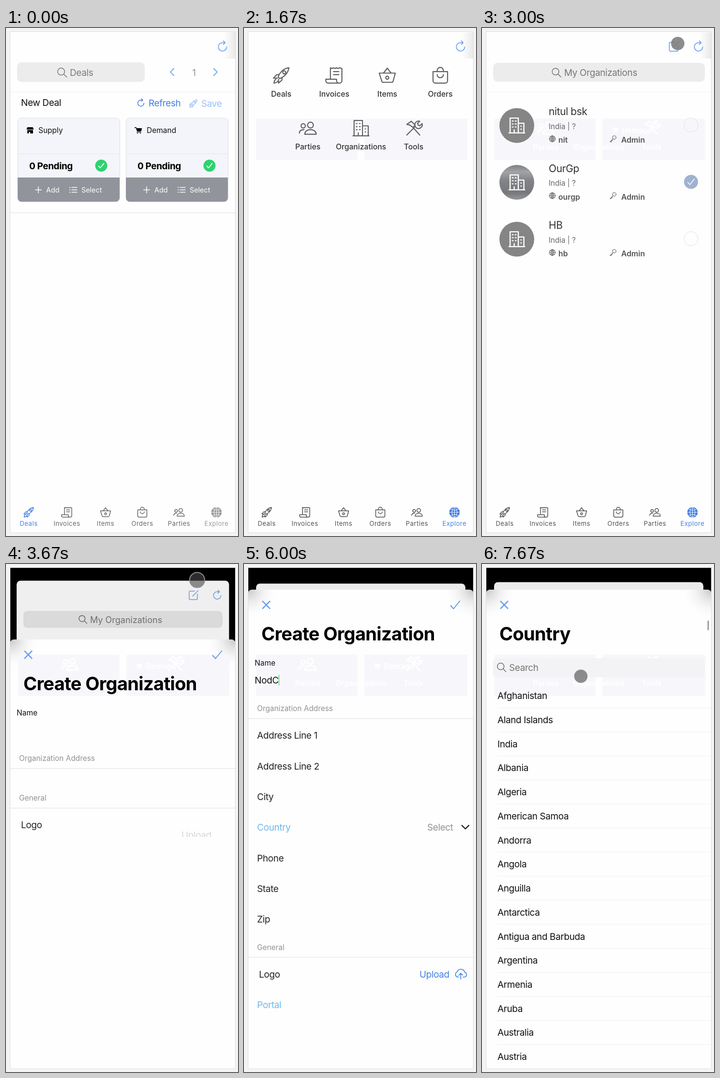
Animation, 480 px wide and 1050 px high, one loop 8 s. Source, as an HTML page:

```html
<!DOCTYPE html>
<html lang="en">
<head>
<meta charset="utf-8">
<title>Create organization</title>
<style>
html, body { margin: 0; width: 100%; height: 100%; overflow: hidden; background: #f4f4f4; }
svg { display: block; width: 100%; height: 100%; }
text { font-family: Inter, Roboto, sans-serif; white-space: pre; }
</style>
</head>
<body>
<svg viewBox="0 0 480 1050" xmlns="http://www.w3.org/2000/svg">
  <defs>
    <clipPath id="phone"><rect x="9" y="8" width="465" height="1034.5"/></clipPath>
    <linearGradient id="edge"><stop offset="0" stop-color="#fff"/><stop offset="1" stop-color="#e9e9e9"/></linearGradient>
    <linearGradient id="photo" x2="0" y2="1"><stop offset="0" stop-color="#808083"/><stop offset=".2" stop-color="#a2a3a7"/><stop offset=".45" stop-color="#828387"/><stop offset=".8" stop-color="#77787c"/><stop offset="1" stop-color="#96979a"/></linearGradient>
    <radialGradient id="corner"><stop offset="0" stop-color="#c4c4c4"/><stop offset="1" stop-color="#fff" stop-opacity="0"/></radialGradient>
    <filter id="soft" x="-10%" y="-40%" width="120%" height="180%"><feGaussianBlur stdDeviation="3"/></filter>
  </defs>
  <rect x="8.5" y="7.5" width="466" height="1035.5" fill="#fefefe" stroke="#dcdcdc"/>
  <g id="view" clip-path="url(#phone)"></g>
  <g id="over"></g>
</svg>
<script>
const LOOP = 8000;
const BLUE = '#427fe6', SKY = '#6fb8ee', GREY = '#929292', INK = '#222';
const view = document.getElementById('view'), over = document.getElementById('over');

// Icons live in a 24 x 24 box.
const ICONS = {
  rocket: '<path d="M8 14C10 8 15 3 22 2c-1 7-6 12-12 14zM9 11H6l-4 4.500h5M13 15v3l-4.500 4v-5M5 17c-2 1-2.500 5-2.500 5s4-.5 5-2.500"/><circle cx="16" cy="8" r="2"/>',
  invoice: '<path d="M7 16V2l2 1 2-1 2 1 2-1 2 1 2-1 3 1v16a3 3 0 0 1-3 3H4a3 3 0 0 1-3-3v-2h14v2a3 3 0 0 0 3 3M11 7h7M11 11h7"/>',
  basket: '<path d="M1.500 9h21l-3 11a2 2 0 0 1-2 1H7a2 2 0 0 1-2-1zM7 9l5-6.500L17 9"/><circle cx="12" cy="15" r="2"/>',
  bag: '<path d="M2.500 7h19v12a3 3 0 0 1-3 3h-13a3 3 0 0 1-3-3zM8 7V5.500a4 4 0 0 1 8 0V7M8 11a4 4 0 0 0 8 0"/>',
  people: '<circle cx="15.500" cy="8" r="3.800"/><path d="M8 20c0-3.500 3-6 7.500-6s7.500 2.500 7.500 6zM1 18.500c0-3 2-4.500 6-4.500"/><circle cx="6" cy="9" r="2.800"/>',
  grid: '<path d="M2 12h20M12 2v20M4.500 5.500q7.500 5 15 0M4.500 18.500q7.500-5 15 0"/><ellipse cx="12" cy="12" rx="5" ry="10"/>',
  globe: '<circle cx="12" cy="12" r="10"/><ellipse cx="12" cy="12" rx="4.500" ry="10"/><path d="M2 12h20M12 2v20M4.500 6q7.500 4 15 0M4.500 18q7.500-4 15 0"/>',
  search: '<circle cx="10" cy="10" r="7.600"/><path d="M15.700 15.700 22 22"/>',
  refresh: '<path d="M20 13a8 8 0 1 1-8-8h5M13.500 1.500 17 5l-3.500 3.500"/>',
  edit: '<path d="M20 10v10a1.500 1.500 0 0 1-1.500 1.500h-14A1.500 1.500 0 0 1 3 20V5.500A1.500 1.500 0 0 1 4.500 4H14M10 14.500 21.500 3"/>',
  key: '<circle cx="16" cy="8" r="5.500"/><path d="M12 12 2.500 21.500H7V18h3v-3"/>',
  cloud: '<path d="M8 18H6a5 5 0 0 1-.5-9.500A7 7 0 0 1 19 9a4.600 4.600 0 0 1 0 9h-3M12 22V11.500M8.500 14.500 12 11l3.500 3.500"/>',
  tools: '<path d="M3 21 13 11M3 7l6-4 5 5-3 3-4-3zM12 12l8 9M14 10a5 5 0 0 1 6-7l-3 3 1 2 2 1 3-3a5 5 0 0 1-7 6z"/>',
  building: '<path d="M3 22V2h11v20M14 9h7.500v13M1.500 22h21M6 6h1M10 6h1M6 10h1M10 10h1M6 14h1M10 14h1M8.500 22v-4M17.500 13h.5M17.500 17h.5"/>',
  store: '<path fill="currentColor" d="M4 3h16l2 6-2 3v9h-7v-5H7v5H4v-9L2 9z"/><path stroke="#f4f5fa" d="M2 10.500h20"/>',
  cart: '<path fill="currentColor" d="M1 3h4l1 3h16l-2 9H8L5 4H1zM7 18h13"/><circle cx="9" cy="21" r="1"/><circle cx="18" cy="21" r="1"/>',
  list: '<path d="M8 5h15M8 12h15M8 19h15M1.500 5h2M1.500 12h2M1.500 19h2"/>',
  plus: '<path d="M12 2v20M2 12h20"/>',
  close: '<path d="M4 4l16 16M20 4 4 20"/>',
  check: '<path d="M2.500 13.500 8.500 20 21.500 4"/>',
  left: '<path d="M16 3 7 12l9 9"/>',
  right: '<path d="M8 3l9 9-9 9"/>',
  down: '<path d="M3 8l9 9 9-9"/>'
};

function icon(name, x, y, size, color, weight = 1.5) {
  const k = size / 24;
  return `<g transform="translate(${x - size / 2} ${y - size / 2}) scale(${k})" fill="none" color="${color}" stroke="${color}" stroke-width="${weight / k}" stroke-linecap="round" stroke-linejoin="round">${ICONS[name]}</g>`;
}

function text(x, y, s, { size = 19, fill = '#111', weight = 400, anchor = 'start', id = '' } = {}) {
  const gap = size > 30 ? -.68 : size >= 19 ? -.4 : size <= 13 ? .55 : 0;
  return `<text ${id && `id="${id}"`} x="${x}" y="${y}" font-size="${size}" font-weight="${weight}" fill="${fill}" letter-spacing="${gap}" text-anchor="${anchor}">${s}</text>`;
}

const rect = (x, y, w, h, fill, r = 0, more = '') =>
  `<rect x="${x}" y="${y}" width="${w}" height="${h}" rx="${r}" fill="${fill}" ${more}/>`;
const disc = (x, y, r, fill, more = '') => `<circle cx="${x}" cy="${y}" r="${r}" fill="${fill}" ${more}/>`;
const line = (x, y, color = '#dfdfdf') => `<path d="M${x} ${y}H474" stroke="${color}"/>`;
const group = (body, y = 0, alpha = 1) => `<g transform="translate(0 ${y})" opacity="${alpha}">${body}</g>`;
const pointer = (x, y) => disc(x, y, 13.8, '#7d7d7d', 'fill-opacity=".88"');

const TABS = [
  ['Deals', 'rocket', 47], ['Invoices', 'invoice', 126], ['Items', 'basket', 206],
  ['Orders', 'bag', 282], ['Parties', 'people', 358], ['Explore', 'globe', 435.500]
];

function tabs(active) {
  return TABS.map(([label, name, x], i) => {
    const rest = active === 5 ? '#4c5054' : '#646668';
    const color = i === active ? BLUE : i === 5 ? '#9a9a9a' : rest;
    const pic = i === 5
      ? disc(x, 1001, 10.8, color) + icon('grid', x, 1001, 25, '#fff', .9)
      : icon(name, x, 1001, 24, color);
    return pic + text(x, 1028.500, label, { size: 13, fill: color, anchor: 'middle' });
  }).join('');
}

function header() {
  return rect(450, 9, 24, 54, 'url(#edge)') + icon('refresh', 448, 38, 26, '#6a9ff0', 1.7);
}

function dealCard(x, label, name) {
  return rect(x + .5, 186, 211, 173, '#f4f5fa', 8, 'stroke="#dedfe4"') +
    `<path d="M${x} 260h212" stroke="#e3e4e8"/>` +
    `<path d="M${x} 309h211v42a8 8 0 0 1-8 8h-195a8 8 0 0 1-8-8z" fill="#92949c"/>` +
    icon(name, x + 26, 211.5, 16, '#000', 1) + text(x + 43, 217.3, label, { size: 15.5 }) +
    text(x + 24, 291.5, '0 Pending', { weight: 700, fill: '#000' }) +
    disc(x + 173, 284.500, 12.5, '#2dd36f') + icon('check', x + 173, 284.500, 14, '#fff', 1.8) +
    icon('plus', x + 43, 334.500, 15, '#fff') + text(x + 59, 340, 'Add', { size: 14.4, fill: '#fff' }) +
    icon('list', x + 115, 334.500, 17, '#fff') + text(x + 132, 340, 'Select', { size: 14.4, fill: '#fff' });
}

function deals() {
  return header() + rect(23, 71, 264, 40.5, '#ececec', 9) +
    icon('search', 116, 92, 23, '#747474') + text(132, 99, 'Deals', { fill: '#7c7c7c' }) +
    icon('left', 344, 91, 19, '#86b3f7', 2.4) + text(389, 98.500, '1', { fill: GREY, anchor: 'middle' }) +
    icon('right', 433, 91, 19, '#86b3f7', 2.4) + line(9, 132.5, '#f0f0f0') +
    text(31, 161, 'New Deal') + icon('refresh', 279, 154.500, 19, BLUE) + text(295, 162, 'Refresh', { fill: BLUE }) +
    icon('rocket', 387.500, 156, 19, '#9dc0f6', 1.3) + text(404, 163, 'Save', { fill: '#9dc0f6' }) +
    dealCard(24, 'Supply', 'store') + dealCard(248, 'Demand', 'cart') + line(9, 382, '#dcdcdf');
}

// Faint remains of the earlier screens that stay visible under later ones.
function trail(labels) {
  const white = { size: 15.7, fill: '#fff', weight: 600, anchor: 'middle' };
  let out = rect(25, 187, 210, 86, '#f7f7fb', 4) + rect(249, 187, 213, 86, '#f7f7fb', 4);
  if (labels) {
    out += icon('people', 132, 207, 36, '#fff', 3) + icon('tools', 351, 206, 36, '#fff', 3) +
      icon('cart', 275, 211, 16, '#fff', 1) + text(321, 217.3, 'Demand', white) +
      text(132, 251.500, 'Parties', white) + text(242, 251.500, 'Organizations', white) + text(351, 251.500, 'Tools', white);
  }
  return out;
}

function explore() {
  const tile = (label, name, x, y) => icon(name, x, y, 38, '#5f6163', 2.2) +
    text(x, y + 44, label, { size: 15.7, fill: '#333', weight: 500, anchor: 'middle' });
  return header() + TABS.slice(0, 4).map(([label, name], i) => tile(label, name, 77 + i * 109.7, 98)).join('') +
    tile('Parties', 'people', 132, 207) + tile('Organizations', 'building', 242, 207) + tile('Tools', 'tools', 351, 207);
}

const GROUPS = [['nitul bsk', 'nit'], ['OurGp', 'ourgp'], ['HB', 'hb']];

function groups() {
  return GROUPS.map(([name, tag], i) => {
    const y = i * 117.5, on = i === 1;
    return disc(72, 201.500 + y, 36, on ? 'url(#photo)' : '#858585') + icon('building', 72, 201.500 + y, 37, '#fff', 2.4) +
      text(138, 180 + y, name, { size: 21, fill: '#333' }) +
      text(138, 208.5 + y, 'India | ?', { size: 15.2, fill: '#666' }) +
      icon('globe', 145.500, 229 + y, 15, '#555', 1) + text(158, 237 + y, tag, { size: 15.8, weight: 600, fill: '#555' }) +
      icon('key', 271, 229 + y, 16, '#555', 1) + text(288, 237 + y, 'Admin', { size: 15.8, weight: 600, fill: '#555' }) +
      disc(432.500, 200.5 + y, 14.5, on ? '#9fb2d0' : 'none', on ? '' : 'stroke="#e2e2e2"') +
      (on ? icon('check', 432.500, 200.5 + y, 17, '#fff') : '');
  }).join('');
}

function orgPage(loading) {
  const query = icon('search', 154, 92, 22, '#707070') + text(170, 99, 'My Organizations', { fill: '#777' });
  return header() + icon('edit', 397, 38, 25, '#6a9ff0', 1.7) +
    (loading ? '' : rect(23, 72, 438, 39, '#ececec', 9)) + line(9, 132, '#f1f1f1') +
    group(query + groups(), 0, loading ? .55 : 1);
}

function toast() {
  return rect(8, 1014, 153, 31, '#000', 5, 'opacity=".3" filter="url(#soft)"') + rect(8, 1012, 153, 31, '#5cbcc1', 5) +
    text(16, 1034, 'Waiting for bu...', { size: 17.3, fill: '#16292b' });
}

function backdrop(top, detail) {
  let out = rect(8, 7, 467, 300, '#000') + rect(detail ? 22 : 25, top, detail ? 439.5 : 433, 260, detail ? '#efefef' : '#ebebeb', 8);
  if (detail) {
    out += icon('edit', 388, 64, 24, '#6b98dc') + icon('refresh', 437, 64, 23, '#6b98dc') +
      rect(36, 97, 412, 35, '#dadada', 8) + icon('search', 159, 114.500, 20, '#666') +
      text(174, 121.500, 'My Organizations', { size: 18, fill: '#6e6e6e' });
  }
  return out;
}

function sheet(shift, body) {
  const outline = `<path d="M8 1050V${63 + shift}q0-10 10-10h447q10 0 10 10V1050z" fill="#fefefe"/>`;
  const shade = x => disc(x, 53 + shift, 62, 'url(#corner)');
  return outline + `<clipPath id="cut">${outline}</clipPath>` +
    `<g clip-path="url(#cut)">${shade(8) + shade(475) + trail(true)}</g>` +
    group(icon('close', 46, 84.500, 22, '#6c9df0', 2.6) + body, shift);
}

const FIELDS = ['Address Line 1', 'Address Line 2', 'City', 'Country', 'Phone', 'State', 'Zip'];
const small = { size: 15.4, fill: GREY };

function form(ready, name, dimmed) {
  let out = icon('check', 437, 84.500, 24, '#5f96ee', 1.9) +
    text(36, 158, 'Create Organization', { size: 38, weight: 700, fill: '#000' }) +
    text(22, 210, 'Name', { size: 15.5 }) + text(22, 247, name, { id: 'name' }) +
    text(27, 304, 'Organization Address', small) + line(9, 319.5);
  if (!ready) {
    return out + text(27, 386, 'General', small) + line(9, 401.5) + text(31, 443, 'Logo', { fill: INK }) +
      '<clipPath id="part"><path d="M350 440h100v21h-100z"/></clipPath>' +
      `<g clip-path="url(#part)">${text(363, 464, 'Upload', { fill: '#d5d5d5' })}</g>`;
  }
  FIELDS.forEach((label, i) => {
    out += text(27, 361.3 + i * 63.35, label, { fill: label === 'Country' ? SKY : INK });
  });
  return out + text(379, 551.3, 'Select', { fill: dimmed ? '#d0d0d0' : GREY }) +
    icon('down', 458, 543.500, 19, dimmed ? '#9b9b9b' : '#222', 2.3) +
    text(27, 797.5, 'General', small) + line(9, 813) + text(31, 855, 'Logo', { fill: INK }) +
    text(363, 855, 'Upload', { fill: BLUE }) + icon('cloud', 448.500, 847, 27, BLUE, 1.6) +
    text(27, 918, 'Portal', { fill: SKY });
}

const COUNTRIES = ['Afghanistan', 'Aland Islands', 'India', 'Albania', 'Algeria', 'American Samoa', 'Andorra',
  'Angola', 'Anguilla', 'Antarctica', 'Antigua and Barbuda', 'Argentina', 'Armenia', 'Aruba', 'Australia', 'Austria'];

function countries() {
  return text(36, 158, 'Country', { size: 38, weight: 700, fill: '#000' }) +
    rect(23, 195, 438, 39, '#f3f3f6', 8) + icon('search', 40.5, 213.5, 22, '#707070') +
    text(56, 220.5, 'Search', { fill: '#777' }) + rect(466.500, 117, 3, 20, '#9b9b9b', 1.5) +
    COUNTRIES.map((c, i) => text(32, 279.3 + i * 49.72, c) + line(32, 297.2 + i * 49.72, '#efefef')).join('');
}

const TYPED = ['N', 'Nod', 'Nod C', 'Nod ', 'NodC', 'NodCalm'];

function scene(step) {
  if (step < 4) return deals() + tabs(0) + (step === 3 ? pointer(431, 1018) : '');
  if (step < 7) return trail(false) + group(explore(), 0, step === 4 ? .6 : 1) + tabs(5) + (step === 6 ? pointer(249, 211) : '');
  if (step < 11) {
    const hand = { 7: [249, 211], 9: [405, 32], 10: [395, 33] }[step];
    return trail(true) + orgPage(step === 7) + tabs(5) + (hand ? pointer(...hand) : '');
  }
  if (step === 11) {
    return backdrop(34.5, true) + sheet(103, form(false, '')) +
      disc(395.500, 33, 15.5, '#4a4a4a', 'fill-opacity=".6" stroke="#8c8c8c" stroke-width="2"');
  }
  if (step < 22) {
    const name = step < 14 ? '' : TYPED[Math.min(step - 14, 5)];
    return backdrop(40.5) + sheet(step === 12 ? 4 : 0, form(true, name, step === 21)) + (step === 21 ? pointer(427, 555.500) : '');
  }
  return backdrop(37.5) + sheet(step === 22 ? 15 : 0, countries()) + (step === 23 ? pointer(204.500, 232) : '');
}

// The screen refreshes three times a second, with hard cuts between poses.
let shown = -1;
function draw(now) {
  const step = Math.min(23, Math.floor((now % LOOP + 4) * 3 / 1000));
  if (step !== shown) {
    shown = step;
    view.innerHTML = scene(step);
    over.innerHTML = step === 7 ? toast() : '';
    if (step >= 14 && step < 20) {
      const x = 22 + document.getElementById('name').getComputedTextLength();
      view.insertAdjacentHTML('beforeend', rect(x, 229, 1.6, 22, '#5fd98a'));
    }
  }
  requestAnimationFrame(t => draw(Math.max(0, t - start)));
}
const start = performance.now();
draw(0);
</script>
</body>
</html>
```
